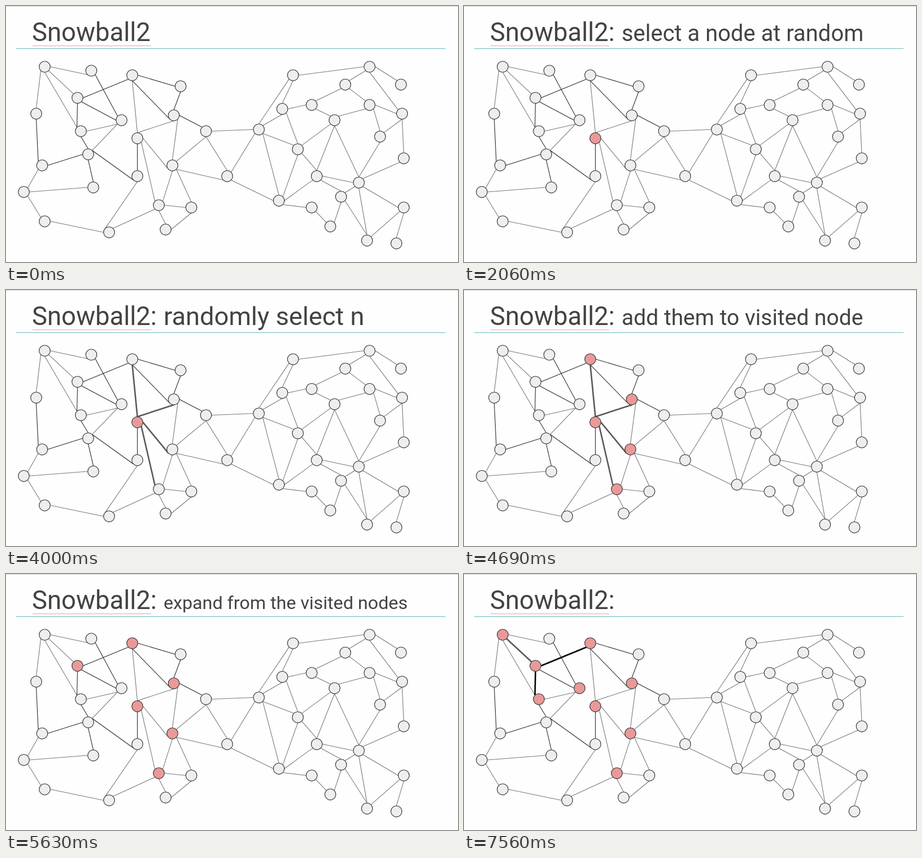
These frames come from a looping animation (800 px wide and 453 px high, 8000 ms). An HTML page:

```html
<!DOCTYPE html>
<html lang="en">
<head>
<meta charset="utf-8">
<title>Snowball sampling</title>
<style>
  html, body { margin: 0; width: 100%; height: 100%; overflow: hidden; background: #fefefe; }
  svg { display: block; width: 800px; height: 453px; }
  text { font-family: Roboto, Inter, sans-serif; fill: #434343; }
  line { stroke: #7a7a7a; stroke-width: 1.1; }
  line.dark { stroke: #2c2c2c; }
  line.bold { stroke: #595959; stroke-width: 2.6; }
  line.dark.bold { stroke: #000; }
  circle { fill: #eee; stroke: #333; stroke-width: 1.15; }
  circle.visited { fill: #ea9999; }
  .squiggle { fill: none; stroke: #ee7d7d; stroke-width: .8; }
</style>
</head>
<body>
<svg viewBox="0 0 800 453">
  <rect width="800" height="1" fill="#d0d0d0"/>
  <rect x="18" y="74.8" width="760" height="1.2" fill="#7cc3c3"/>
  <path id="squiggle" class="squiggle"/>
  <text id="title" x="46" y="61.5" font-size="45.4"></text>
  <text id="note" x="279" y="61.5"></text>
  <g id="edges"></g>
  <g id="nodes"></g>
</svg>
<script>
const LOOP = 8000, R = 9.8;
const NAMES = 'ABCDEFGHIJKLMNOPQRSTUVWXYZabcdefghijklmnopqrs';
const SIDES = ['e', 'se', 's', 'sw', 'w', 'nw', 'n', 'ne'];

// Node centres, in the order of NAMES.
const points = [
  [68.5, 107.5], [151, 114.5], [223.5, 122.5], [309, 142], [126.5, 162.5],
  [53.5, 190.5], [204.5, 202], [132.5, 221.5], [297, 193.5], [232.5, 234],
  [354, 221.5], [145.5, 262.5], [64, 282], [232.5, 301], [294.5, 282],
  [31.5, 329], [154.5, 321], [68.5, 381], [182.5, 400.5], [270.5, 352.5],
  [328, 356.5], [282.5, 395.5], [391.5, 301], [447.5, 218.5], [508, 122.5],
  [489, 182], [541, 175], [600.5, 139], [643.5, 107.5], [699, 139],
  [643.5, 175], [701, 190.5], [581.5, 202], [662, 231], [704, 269.5],
  [516.5, 253.5], [550, 301], [624.5, 312.5], [593, 337.5], [483, 344.5],
  [541, 356.5], [574, 390], [639, 415], [704, 356.5], [691, 420]
];

// Walks through the graph. A line leaves a node on the side facing its
// neighbour, unless a side is given after the dot.
const grayWalks = `A-B.sw A-E A.s-H A.sw-F H-G.sw G-L M-P-R-S-T-U P-Q S.nw-N.s
  C-J J.n-I.s J.e-O.sw J.se-T.nw I.se-O O-K.s O.se-W.sw O-T.ne O-U.n T-V
  V.e-U.s K-X-j K.s-W.n X-W-n.w X.n-Y X-Z.s X.se-n c-Y-Z-a-b-c Z.se-j j-n.ne
  b-e-g-a c.e-d c.s-f e-f-i-l-k-g-l e.se-h f.s-h h.s-l.n g-j-k.n k-m.n k-n.e
  l-m m-p.ne m-q.n l-q-r-s l-r.w n.se-o o-p`;
const darkWalks = `B-G E-C.sw E-G.w E-H.nw F-M.nw M-L-Q H-L L.ne-N.sw
  C-D-I C.s-I.sw I.e-K J-N`;

// Bold lines join the hub to its picks.
const steps = [
  { at: 0, title: 'Snowball2' },
  { at: 2060, note: 'select a node at random', size: 39.95, visited: 'J' },
  { at: 2560, note: 'get its neighbors (1 hop in this case)', size: 27, visited: 'J', hub: 'J', picks: 'CIOTN' },
  { at: 3750, note: 'randomly select n', size: 45.2, visited: 'J', hub: 'J', picks: 'CIOT' },
  { at: 4250, note: 'add them to visited node', size: 39, visited: 'JCIOT', hub: 'J', picks: 'CIOT' },
  { at: 4810, note: 'add them to visited node', size: 39, visited: 'JCIOT' },
  { at: 5630, note: 'expand from the visited nodes', size: 32.2, visited: 'JCIOTE' },
  { at: 6380, visited: 'JCIOTE', hub: 'E', picks: 'AHC' },
  { at: 7190, visited: 'JCIOTEAGH', hub: 'E', picks: 'AHC' }
];

const $ = id => document.getElementById(id);
const center = name => points[NAMES.indexOf(name)];

function add(parent, tag, attrs) {
  const el = document.createElementNS('http://www.w3.org/2000/svg', tag);
  for (const key in attrs) el.setAttribute(key, attrs[key]);
  return parent.appendChild(el);
}

function anchor(from, to) {
  const [x, y] = center(from.name), [tx, ty] = center(to.name);
  const eighth = Math.PI / 4;
  const turn = from.side ? SIDES.indexOf(from.side) : Math.round(Math.atan2(ty - y, tx - x) / eighth);
  return [x + R * Math.cos(turn * eighth), y + R * Math.sin(turn * eighth)];
}

const edges = [];
function addWalks(walks, kind) {
  for (const walk of walks.split(/\s+/)) {
    const stops = walk.split('-').map(s => ({ name: s[0], side: s.slice(2) }));
    for (let i = 1; i < stops.length; i++) {
      const a = stops[i - 1], b = stops[i];
      const [x1, y1] = anchor(a, b), [x2, y2] = anchor(b, a);
      const el = add($('edges'), 'line', { x1, y1, x2, y2, class: kind });
      edges.push({ el, a: a.name, b: b.name });
    }
  }
}
addWalks(grayWalks, 'gray');
addWalks(darkWalks, 'dark');
const dots = points.map(([cx, cy]) => add($('nodes'), 'circle', { cx, cy, r: R }));

let wave = 'M47 71.3';
for (let i = 1; i <= 105; i++) wave += `L${47 + i * 2} ${i % 2 ? 69.5 : 71.3}`;
$('squiggle').setAttribute('d', wave);

function show({ title = 'Snowball2:', note = '', size = 40, visited = '', hub, picks = '' }) {
  $('title').textContent = title;
  $('note').textContent = note;
  $('note').setAttribute('font-size', size);
  dots.forEach((dot, i) => dot.classList.toggle('visited', visited.includes(NAMES[i])));
  for (const { el, a, b } of edges) {
    const bold = (a === hub && picks.includes(b)) || (b === hub && picks.includes(a));
    el.classList.toggle('bold', bold);
  }
}

let current;
const start = performance.now();
function tick() {
  const t = (performance.now() - start) % LOOP;
  const step = steps.findLast(s => s.at <= t);
  if (step !== current) show(current = step);
  requestAnimationFrame(tick);
}
tick();
</script>
</body>
</html>
```
